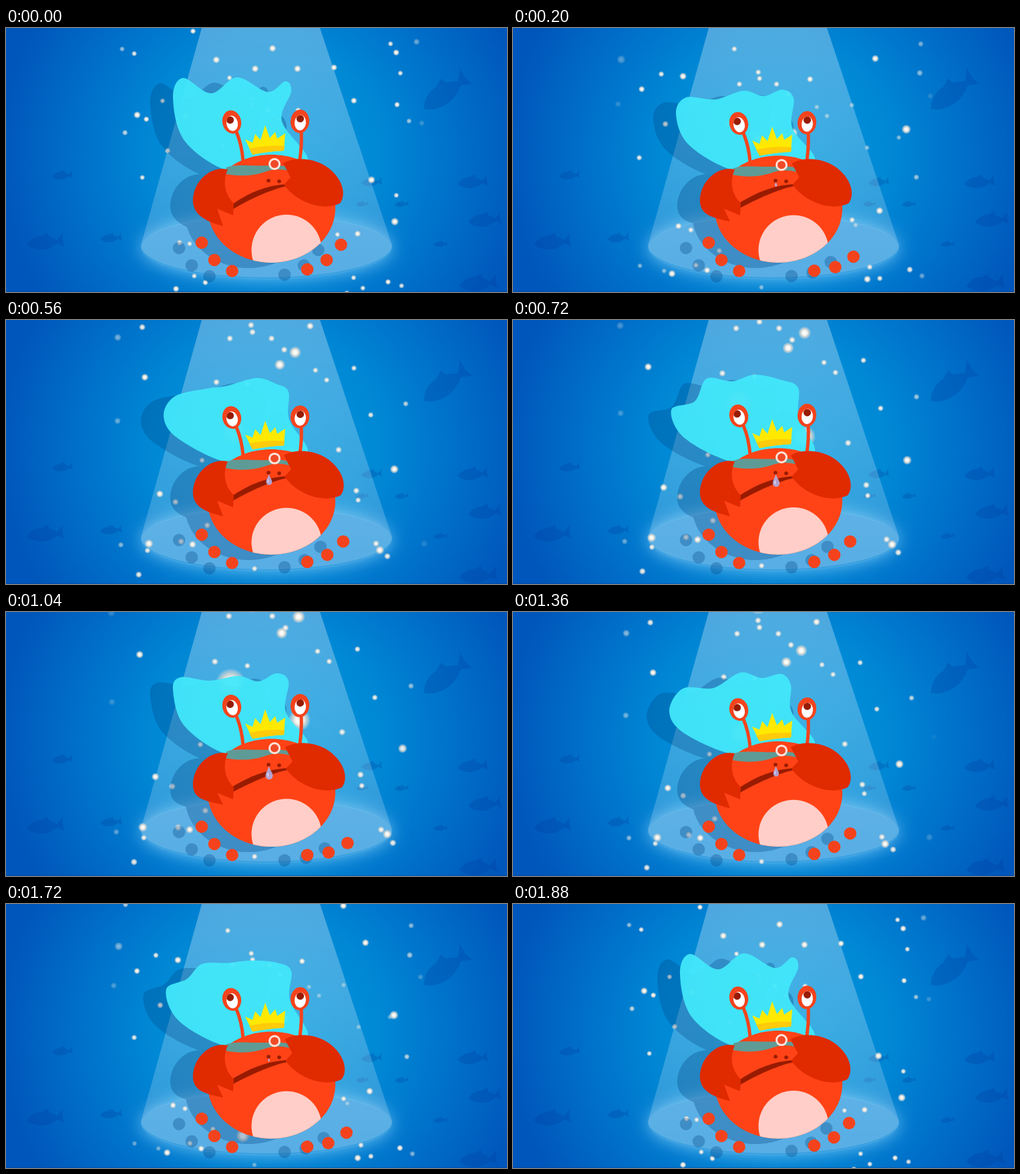
Animation of 750x396 px, one loop 1.92 s. Source, as an HTML page with a canvas:

```html
<!DOCTYPE html>
<html lang="en">
<head>
<meta charset="utf-8">
<title>Crying crab</title>
<style>
html, body { margin: 0; width: 100%; height: 100%; overflow: hidden; background: #0058bb; }
canvas { display: block; width: 750px; height: 396px; }
</style>
</head>
<body>
<canvas id="stage" width="750" height="396"></canvas>
<script>
const W = 750, H = 396, LOOP = 1920, STEP = 40;
const makeLayer = () => Object.assign(document.createElement('canvas'), { width: W, height: H });
const view = document.getElementById('stage').getContext('2d');
const backdrop = makeLayer(), crab = makeLayer();
const c = crab.getContext('2d');

const RED = '#ff4316', CLAW = '#e02a00', DARK = '#981b00', TOE = '#f4431c';
const clamp = (v, a = 0, b = 1) => Math.min(b, Math.max(a, v));

function oval(g, x, y, rx, ry, color, rot = 0) {
  g.beginPath();
  g.ellipse(x, y, rx, ry, rot, 0, Math.PI * 2);
  g.fillStyle = color;
  g.fill();
}
const dot = (g, x, y, r, color) => oval(g, x, y, r, r, color);

function shape(g, d, color) {
  g.fillStyle = color;
  g.fill(new Path2D(d));
}

// ---- static scenery ----
function fish(g, x, y, len, rot = -0.06) {
  g.save();
  g.translate(x, y);
  g.rotate(rot);
  g.scale(len / 100, len / 100);
  shape(g, 'M-50 4C-30-24 5-24 34-3L52-22Q47 0 54 16L34 6C8 27-30 24-50 4ZM-12-15L10-26L14-12Z', 'rgba(0,62,155,.27)');
  g.restore();
}

function paintBackdrop() {
  const g = backdrop.getContext('2d');
  const bg = g.createRadialGradient(390, 190, 20, 390, 190, 400);
  bg.addColorStop(0, '#0099dd');
  bg.addColorStop(0.4, '#0088d5');
  bg.addColorStop(0.75, '#006bc7');
  bg.addColorStop(1, '#0056ba');
  g.fillStyle = bg;
  g.fillRect(0, 0, W, H);

  fish(g, 656, 97, 78, -0.6);
  fish(g, 84, 221, 30);
  fish(g, 58, 321, 54);
  fish(g, 157, 315, 31);
  fish(g, 698, 231, 44);
  fish(g, 716, 288, 48);
  fish(g, 547, 231, 30);
  fish(g, 592, 264, 20);
  fish(g, 533, 264, 18);
  fish(g, 650, 324, 20);
  fish(g, 706, 383, 55);

  // glow around the pool of light
  g.save();
  g.shadowColor = 'rgba(150,215,255,.75)';
  g.shadowBlur = 26;
  oval(g, 390, 329, 187, 47, '#2596dc');
  g.restore();

  const beam = g.createLinearGradient(0, 0, 0, 376);
  beam.addColorStop(0, 'rgba(255,255,255,.31)');
  beam.addColorStop(0.6, 'rgba(255,255,255,.21)');
  beam.addColorStop(1, 'rgba(255,255,255,.16)');
  shape(g, 'M293 0H470L578 326A188 48 0 0 1 202 326Z', beam);
  oval(g, 390, 329, 188, 48, 'rgba(190,225,245,.13)');
  g.fillStyle = 'rgba(0,50,130,.35)';
  g.fillRect(0, 395, W, 1);
}

// ---- drifting lights: x, y pairs by nearness ----
const lights = {
  0.2: [459,97, 475,111, 514,94, 538,161, 588,145, 372,381, 297,226, 520,283, 181,347, 219,355, 362,117],
  0.24: [178,173, 213,40, 260,288, 268,344, 208,391, 305,321, 516,272, 544,347, 560,365, 491,214,
    414,72, 369,47, 367,37, 337,56, 396,56, 318,118, 618,204, 164,-42, 143,-50, 608,-59, 625,-8,
    329,0, 640,75, 627,361],
  0.28: [180,59, 218,115, 239,279, 285,350, 450,43, 610,349, 626,33, 142,83, 263,-98, 240,-112, 670,66],
  0.35: [244,29, 226,352, 565,249, 545,361, 558,0, 521,-62, 637,-90, 675,-110],
  0.45: [406,114, 137,-13, 296,-124, 409,-147, 459,-106, 374,-106],
  0.51: [426,103, 619,97],
  0.6: [691,157],
  0.85: [367,70, 421,264],
  1.1: [347,247]
};
const FAR_X = 370, FAR_Y = 550;

function glow(g, x, y, r, alpha) {
  const halo = g.createRadialGradient(x, y, 0, x, y, r);
  halo.addColorStop(0, '#fff');
  halo.addColorStop(0.35, '#fffaf2');
  halo.addColorStop(0.62, 'rgba(226,218,206,.85)');
  halo.addColorStop(0.82, 'rgba(214,214,214,.5)');
  halo.addColorStop(1, 'rgba(214,220,228,0)');
  g.globalAlpha = alpha;
  dot(g, x, y, r, halo);
  g.globalAlpha = 1;
}

function drawLights(g, u) {
  for (const key in lights) {
    const near = +key, zoom = 1 - near * (u - 0.434), list = lights[key];
    const fog = near < 0.22 ? 0.9 * (1 - u * u) : near < 0.26 ? 0.88 : 0.96;
    for (let i = 0; i < list.length; i += 2) {
      const x = FAR_X + (list[i] - FAR_X) * zoom;
      const y = FAR_Y + (list[i + 1] - FAR_Y) * zoom;
      const edge = clamp((x - 150) / 38) * clamp((632 - x) / 42);
      if (edge > 0) glow(g, x, y, (1.7 + 12.5 * near) * zoom, edge * fog);
    }
  }
}

// ---- cape ----
const poses = [
  [268,170, 250,105, 265,75, 307,98, 346,74, 392,96, 418,80, 427,95, 413,140],
  [268,172, 250,118, 261,98, 305,103, 347,96, 378,104, 405,92, 423,104, 419,150],
  [258,183, 234,150, 254,115, 300,114, 340,91, 372,99, 402,93, 416,110, 417,150],
  [258,178, 236,145, 252,115, 300,103, 330,99, 375,87, 405,96, 423,108, 424,150],
  [258,178, 237,135, 272,122, 290,88, 328,92, 362,82, 402,90, 427,102, 428,145]
];
const poseAt = [[0, 0], [80, 1], [400, 2], [560, 3], [720, 4], [920, 0], [960, 0]];

function cape(t) {
  const p = t % 960;
  const i = poseAt.findIndex((k, n) => p < poseAt[n + 1][0]);
  const [t0, a] = poseAt[i], [t1, b] = poseAt[i + 1];
  const k = (p - t0) / (t1 - t0);
  const flat = poses[a].map((v, n) => v + (poses[b][n] - v) * k);
  const pts = [[335, 215]];
  for (let n = 0; n < flat.length; n += 2) pts.push([flat[n], flat[n + 1]]);
  pts.push([452, 196], [420, 215]);

  const at = n => pts[(n + pts.length) % pts.length];
  c.beginPath();
  c.moveTo(...pts[0]);
  pts.forEach((q, n) => {
    const prev = at(n - 1), next = at(n + 1), after = at(n + 2);
    c.bezierCurveTo(
      q[0] + (next[0] - prev[0]) / 6, q[1] + (next[1] - prev[1]) / 6,
      next[0] - (after[0] - q[0]) / 6, next[1] - (after[1] - q[1]) / 6,
      next[0], next[1]);
  });
  c.fillStyle = 'rgba(66,232,250,.94)';
  c.fill();
}

// ---- crab ----
function stalk(d) {
  c.strokeStyle = TOE;
  c.lineWidth = 5;
  c.lineCap = 'round';
  c.stroke(new Path2D(d));
}

function eye(x, y, px, py, rot, shut) {
  oval(c, x, y, 14, 17.5, TOE, rot);
  c.save();
  c.beginPath();
  c.ellipse(x + 0.5, y + 2, 8.5, 11.5, rot, 0, 7);
  c.clip();
  c.fillStyle = '#fff';
  c.fillRect(x - 20, y - 20, 40, 40);
  dot(c, px, py, 5.6, DARK);
  if (shut > 0) oval(c, x, y - 24 + 20 * shut, 13, 13.5, TOE, rot);
  c.restore();
}

function crown() {
  shape(c, 'M358 167L369 172L373 159L381 168L388 146L395 165L403 156L406 166L418 158L416 184Q392 185 369 190Z', '#ffe900');
  shape(c, 'M364 181Q390 175 417 177L416 184Q392 185 369 190Z', '#ffcb0a');
}

function body() {
  const d = new Path2D('M397 190C453 190 493 227 493 270C493 316 449 352 397 352C345 352 302 316 302 270C302 227 341 190 397 190Z');
  c.fillStyle = RED;
  c.fill(d);
  c.save();
  c.clip(d);
  oval(c, 420, 333, 52.5, 53, '#ffcec8');
  c.restore();
}

function tear(s) {
  if (s < 0.03) return;
  c.save();
  c.translate(393.5, 231);
  c.scale(s, s);
  shape(c, 'M0 0C2 7 6 10 6 15A5.5 5.5 0 0 1-5 15C-5 10-2 7 0 0Z', 'rgba(176,170,222,.92)');
  shape(c, 'M-1 9Q-4 14-1 17Q1 14-1 9Z', 'rgba(235,235,255,.7)');
  c.restore();
}

function drawCrab(t, u) {
  const phase = t % 640;
  const tap = Math.min(1, Math.min(phase, 640 - phase) / 245);
  const squash = (1 - Math.cos(t / 960 * Math.PI * 2)) / 2;
  const shut = clamp(1 - Math.abs(t - 400) / 130);

  c.clearRect(0, 0, W, H);
  cape(t);

  c.save();
  c.translate(0, 352);
  c.scale(1, 1 - 0.027 * squash);
  c.translate(0, -352);
  stalk('M345 156Q353 175 355 200');
  stalk('M442 155Q443 175 440 197');
  body();
  shape(c, 'M330 209C345 203 365 208 400 206Q418 205 434 212L426 215Q406 209 390 215C372 222 350 223 329 219Z', '#5f9b96');
  eye(338, 141, 335.5, 138, -0.2, shut);
  eye(440, 140, 440.5, 136, 0.08, shut);
  crown();
  dot(c, 402, 204, 9, '#ffe3da');
  dot(c, 402, 204, 6, '#ef4a28');
  c.restore();

  shape(c, `M${338 - 4 * tap} 265C365 246 390 236 421 234L421 237C400 241 365 256 ${338 - 4 * tap} 273Z`, DARK);
  dot(c, 393, 229, 2.8, DARK);
  dot(c, 409, 230, 2.8, DARK);
  tear(1 - u);

  const tip = 297 - 8 * tap;
  shape(c, `M332 212C303 206 278 234 280 262C282 283 305 ${tip - 5} 325 ${tip}L316 271L340 281L341 263C327 249 324 230 332 212Z`, CLAW);

  c.save();
  c.translate(3 * tap, 0);
  shape(c, 'M415 203C432 192 465 195 484 211C506 229 509 252 500 263C476 275 436 263 416 235L426 224Z', CLAW);
  c.restore();

  [[293, 322], [312, 348], [338.5, 364.5],
   [451, 362 + 2.5 * tap], [480 + 3 * tap, 348 + 13 * tap], [501.5 + 10 * tap, 325 + 22 * tap]]
    .forEach(([x, y]) => dot(c, x, y, 9.3, TOE));
}

function render(t) {
  const u = 1 - Math.cos(Math.PI / 2 * Math.abs(t - 940) / 940);
  drawCrab(t, u);
  view.drawImage(backdrop, 0, 0);
  drawLights(view, u);
  view.save();
  view.shadowColor = 'rgba(0,64,125,.3)';
  view.shadowOffsetX = -34;
  view.shadowOffsetY = 8;
  view.drawImage(crab, 0, 0);
  view.restore();
}

paintBackdrop();
const start = performance.now();
function tick(now) {
  const t = Math.max(0, now - start) % LOOP;
  render(Math.floor(t / STEP) * STEP);
  requestAnimationFrame(tick);
}
render(0);
requestAnimationFrame(tick);
</script>
</body>
</html>
```
